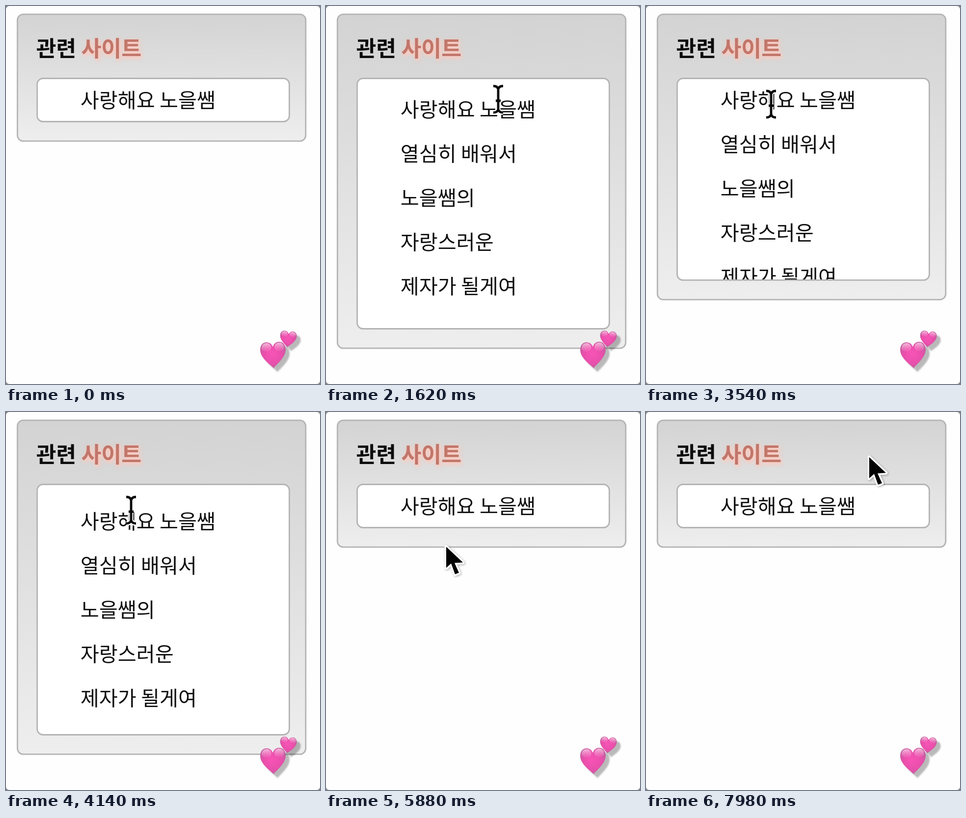
These frames come from a looping animation (640 px wide and 770 px high, 8 s). An HTML page with a canvas:

```html
<!DOCTYPE html>
<html lang="ko">
<head>
<meta charset="utf-8">
<style>
  html, body { margin: 0; width: 100%; height: 100%; overflow: hidden; background: #8a8a8a; }
  canvas { display: block; }
</style>
</head>
<body>
<canvas id="stage" width="640" height="770"></canvas>
<script>
const ctx = document.getElementById('stage').getContext('2d');
const LOOP = 8000;
const PHASE = 400; // height moves first, padding follows
const FONT = '"Noto Sans CJK KR", "Noto Sans CJK", "Noto Sans KR", sans-serif';
const ROWS = ['사랑해요 노을쌤', '열심히 배워서', '노을쌤의', '자랑스러운', '제자가 될게여'];

const HOVERS = [[1080, 2050], [3355, 4546], [5980, 6930]];
const TEXT_CURSOR = [[1150, 2050], [3330, 4450]];
// time, x, y of the pointer
const POINTER = [
  [430, 662, 320], [800, 592, 255], [1080, 470, 222], [1350, 351, 190], [1900, 351, 190],
  [2060, 346, 142], [2300, 330, 80], [2950, 290, 80], [3355, 256, 150], [3480, 255, 200],
  [4330, 255, 200], [4546, 390, 145], [4740, 660, 24],
  [5350, 662, 420], [5650, 300, 345], [5880, 245, 275], [5980, 246, 233], [6150, 248, 200],
  [6840, 248, 200], [6930, 268, 146], [7250, 380, 98], [7700, 455, 92], [8000, 455, 92]
];

const mix = (a, b, p) => a + (b - a) * p;
const clamp = v => Math.min(1, Math.max(0, v));
const within = (t, spans) => spans.some(([from, to]) => t >= from && t < to);

// cubic-bezier(.25, .1, .25, 1)
function ease(x) {
  x = clamp(x);
  const curve = (a, b, u) => 3 * a * u * (1 - u) ** 2 + 3 * b * u * u * (1 - u) + u ** 3;
  let low = 0, high = 1;
  for (let i = 0; i < 20; i++) {
    const mid = (low + high) / 2;
    if (curve(.25, .25, mid) < x) low = mid; else high = mid;
  }
  return curve(.1, 1, low);
}

// 0 closed, 1 open
const openness = (t, delay) => HOVERS.reduce((sum, [enter, leave]) =>
  sum + ease((t - enter - delay) / PHASE) - ease((t - leave - delay) / PHASE), 0);

function box(x, y, w, h, radius, fill, stroke) {
  ctx.beginPath();
  ctx.roundRect(x, y, w, h, radius);
  ctx.fillStyle = fill;
  ctx.fill();
  if (stroke) {
    ctx.strokeStyle = stroke;
    ctx.lineWidth = 2.8;
    ctx.stroke();
  }
}

function text(string, x, y, size, weight, color) {
  ctx.font = `${weight} ${size}px ${FONT}`;
  ctx.fillStyle = color;
  ctx.fillText(string, x, y);
}

function setShadow(color, offset, blur) {
  ctx.shadowColor = color;
  ctx.shadowOffsetX = ctx.shadowOffsetY = offset;
  ctx.shadowBlur = blur;
}

function drawPanel(t) {
  const height = mix(88, 510, openness(t, 0));
  const padding = mix(0, 30.5, openness(t, PHASE));
  const bottom = 147 + height;
  const gradient = ctx.createLinearGradient(0, 16, 0, bottom + 40);
  gradient.addColorStop(0, '#d3d3d3');
  gradient.addColorStop(1, '#eeeeee');
  box(23.3, 16.8, 587.6, bottom + 23.4, 12, gradient, '#b4b4b4');

  text('관련', 61.5, 103, 44.4, 700, '#0c0c0c');
  ctx.save();
  setShadow('#ffc9bd', 2.5, 9);
  text('사이트', 153.5, 103, 44.4, 700, '#c2766a');
  text('사이트', 153.5, 103, 44.4, 700, '#c2766a');
  ctx.restore();

  box(63.5, 147.5, 514, height, 12, '#fff', '#b4b4b4');
  ctx.save();
  ctx.beginPath();
  ctx.roundRect(64.9, 148.9, 511.2, height - 2.8, 11);
  ctx.clip();
  ROWS.forEach((row, i) => text(row, 151.8, 207.4 + padding + i * 90, 41.3, 400, '#101010'));
  ctx.restore();
}

function drawHeart(x, y, width, height, tilt) {
  ctx.save();
  ctx.translate(x, y);
  ctx.rotate(tilt);
  ctx.scale(width / 2, height / 2);
  const path = new Path2D('M0 1C-.24 .74-1 .2-1-.4C-1-.78-.78-1-.5-1C-.26-1-.08-.86 0-.62' +
    'C.08-.86 .26-1 .5-1C.78-1 1-.78 1-.4C1 .2 .24 .74 0 1Z');
  const pink = ctx.createRadialGradient(-.1, -.1, .1, 0, -.05, 1.1);
  pink.addColorStop(0, '#f654b5');
  pink.addColorStop(.6, '#e94fab');
  pink.addColorStop(1, '#c2609f');
  ctx.fillStyle = pink;
  setShadow('rgba(0,0,0,.27)', 8, 3);
  ctx.fill(path);
  setShadow('transparent', 0, 0);
  ctx.clip(path);
  const shine = ctx.createLinearGradient(0, -1, 0, -.2);
  shine.addColorStop(0, 'rgba(255,215,236,.85)');
  shine.addColorStop(1, 'rgba(255,160,215,0)');
  ctx.fillStyle = shine;
  for (const side of [-.5, .5]) {
    ctx.beginPath();
    ctx.ellipse(side, -.6, .38, .34, 0, 0, Math.PI * 2);
    ctx.fill();
  }
  ctx.restore();
}

const ARROW = new Path2D('M0 0V43L10 34L18 56L26 53L17 33L34 32Z');
const BEAM = new Path2D('M-10-27Q-1-27 0-20Q1-27 10-27M-10 27Q-1 27 0 20Q1 27 10 27M0-21V21M-5 3H5');

function drawPointer(t) {
  const next = POINTER.findIndex(key => key[0] > t);
  if (next < 1) return;
  const [t0, x0, y0] = POINTER[next - 1], [t1, x1, y1] = POINTER[next];
  const p = (t - t0) / (t1 - t0);
  ctx.save();
  ctx.translate(mix(x0, x1, p), mix(y0, y1, p));
  ctx.lineJoin = 'round';
  ctx.strokeStyle = '#fff';
  if (within(t, TEXT_CURSOR)) {
    ctx.lineWidth = 9;
    ctx.stroke(BEAM);
    ctx.strokeStyle = '#080808';
    ctx.lineWidth = 4.8;
    ctx.stroke(BEAM);
  } else {
    ctx.save();
    setShadow('rgba(0,0,0,.3)', 1.5, 4);
    ctx.lineWidth = 7;
    ctx.stroke(ARROW);
    ctx.restore();
    ctx.fillStyle = '#000';
    ctx.fill(ARROW);
  }
  ctx.restore();
}

function frame() {
  const t = performance.now() % LOOP;
  ctx.fillStyle = '#8a8a8a';
  ctx.fillRect(0, 0, 640, 770);
  box(0, 0, 640, 770, 7, '#fefefe');
  drawPanel(t);
  drawHeart(575, 678.5, 34, 33, .1);
  drawHeart(544.5, 711, 52, 53, -.04);
  drawPointer(t);
  requestAnimationFrame(frame);
}
requestAnimationFrame(frame);
</script>
</body>
</html>
```
